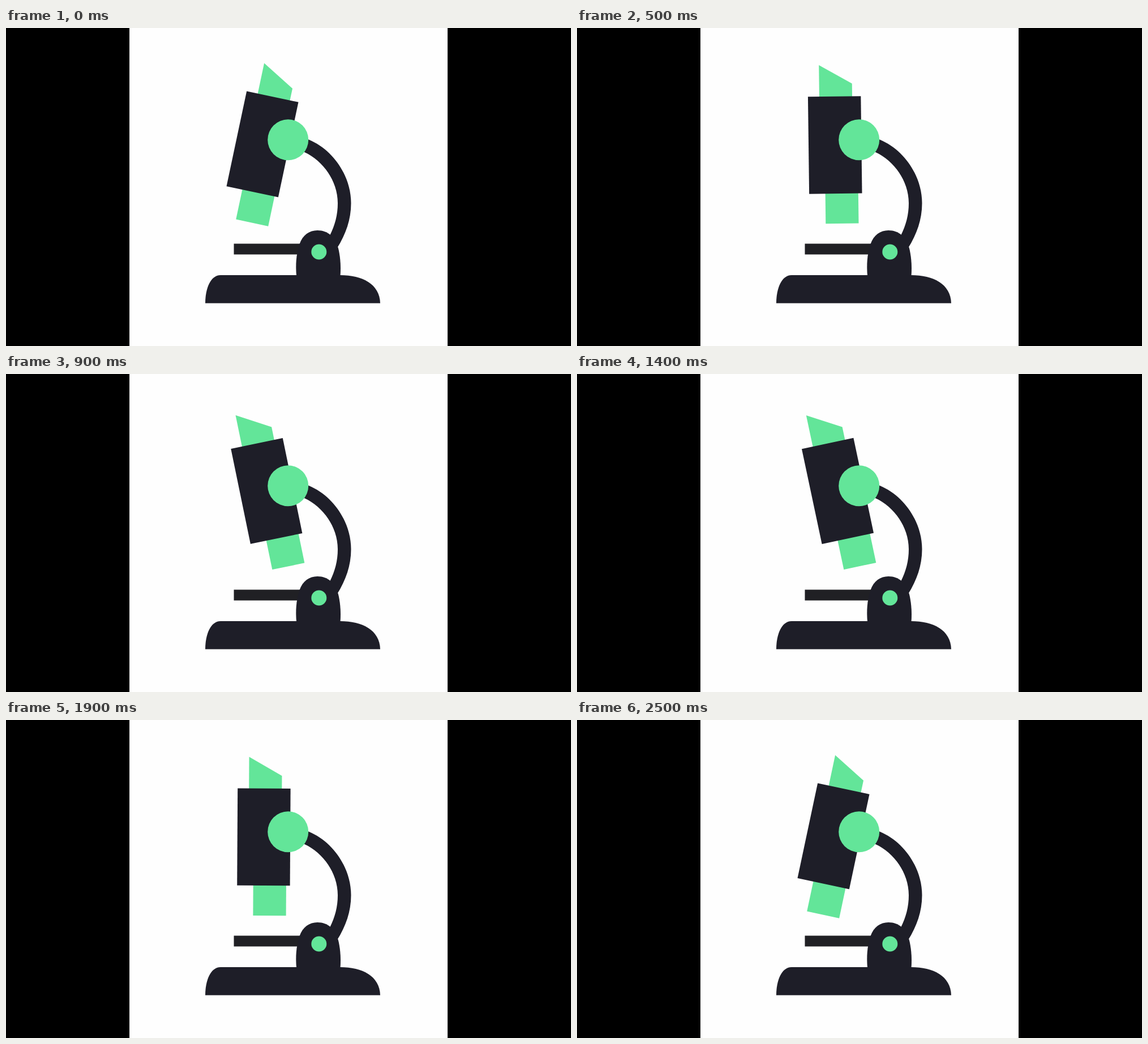
Animation of 998x561 px, one loop 2800 ms. Source, as an HTML page:

```html
<!DOCTYPE html>
<html lang="en">
<head>
<meta charset="utf-8">
<title>Microscope</title>
<style>
  html, body { margin: 0; width: 100%; height: 100%; overflow: hidden; background: #000; }
  svg { display: block; width: 100%; height: 100%; }
  .dark { fill: #1e1e28; }
  .green { fill: #63e599; }
</style>
</head>
<body>
<svg viewBox="0 0 998 561">
  <rect width="998" height="561" fill="#000"/>
  <rect x="218" width="562" height="561" fill="#fefefe"/>

  <g class="dark">
    <path d="M520 190L535 197C578 215 609.5 261 609.5 309C609.5 338 600 364 585 388L572 366C581 348 586 330 586 309C586 270 560 234 527 219Z"/>
    <rect x="402.5" y="380.5" width="120" height="19" fill="#202024"/>
    <path d="M513 437C511.5 420 512 400 518.5 381C524 365 536 357 550 357C560 357 567 360 573 365L586.5 387C590 400 592 418 590.5 437Z"/>
    <path d="M352 485.5C352 460 361 436 379 436H590C630 436 660 452 661 485.5Z"/>
  </g>
  <circle class="green" cx="552.8" cy="395" r="13.5"/>

  <g id="tube">
    <g id="optics" class="green">
      <path d="M-26.7 -141.3L31.4 -108V-70H-26.7Z"/>
      <rect x="-18.2" y="70" width="58.2" height="68.6"/>
    </g>
    <rect class="dark" x="-46.7" y="-85.7" width="93.4" height="171.4"/>
  </g>
  <circle class="green" cx="498.2" cy="197.2" r="36"/>
</svg>
<script>
  const LOOP = 2800, STEP = 100, SWING = 982, TILT = 12;
  const tube = document.getElementById('tube');
  const optics = document.getElementById('optics');

  function ease(time, start) {
    const x = Math.min(1, Math.max(0, (time - start) / SWING));
    return x * x * (3 - 2 * x);
  }

  function draw(ms) {
    const time = Math.floor((ms % LOOP) / STEP) * STEP;
    const angle = TILT * (1 - 2 * ease(time, -11) + 2 * ease(time, 1400));
    // The tube drifts slightly while it tilts.
    const x = 455.5 - 0.3125 * angle + 0.0087 * angle * angle;
    const y = 206.4 - 0.058 * angle - 0.0049 * angle * angle;
    tube.setAttribute('transform', `translate(${x} ${y}) rotate(${angle})`);
    optics.setAttribute('transform', `translate(0 ${0.065 * angle})`);
  }

  const begin = performance.now();
  function tick() {
    draw(performance.now() - begin);
    requestAnimationFrame(tick);
  }
  tick();
</script>
</body>
</html>
```
